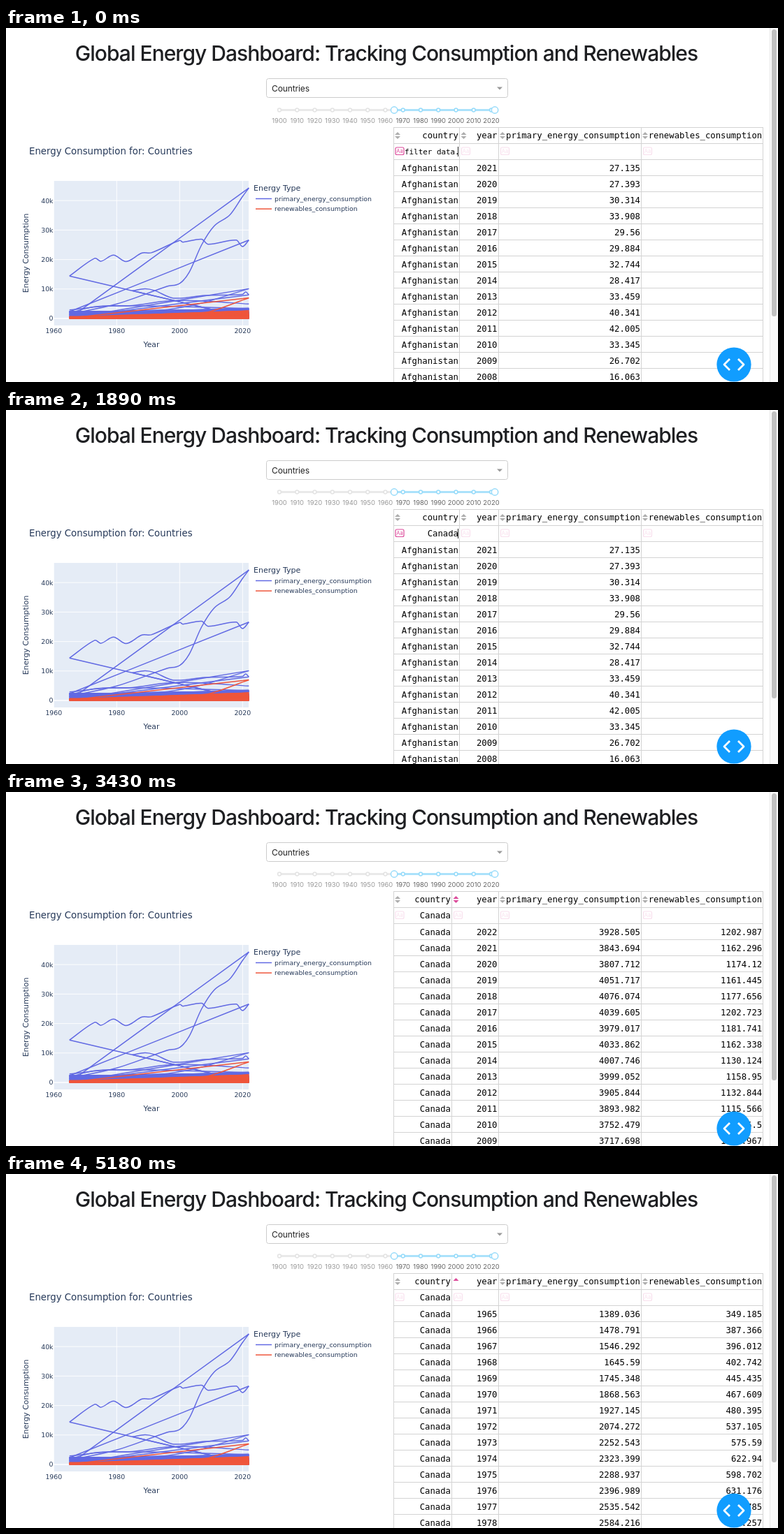
These frames come from a looping animation (1104 px wide and 507 px high, 5.32 s). An HTML page:

```html
<!DOCTYPE html>
<html lang="en">
<head>
<meta charset="utf-8">
<title>Energy dashboard</title>
<style>
  html, body { margin: 0; width: 100%; height: 100%; overflow: hidden; background: #fff; }
  svg { display: block; width: 1104px; height: 507px; }
  text { white-space: pre; }
  .ui { font-family: Inter, sans-serif; font-optical-sizing: none; }
  .plot { font-family: "DejaVu Sans", sans-serif; fill: #263959; }
  .mono { font-family: "DejaVu Sans Mono", monospace; font-size: 12.28px; fill: #000; }
  .end { text-anchor: end; }
  .mid { text-anchor: middle; }
</style>
</head>
<body>
<svg id="stage" viewBox="0 0 1104 507"></svg>
<script>
const LOOP = 5320;
const FILTERED = 2240, HOVER = 3080, YEAR_HOVER = 3290, SORTED = 4130;
const GREY = '#adadad', PINK = '#dc4b9b', BLUE = '#96dbfa', RULE = '#d3d3d3';
const PURPLE = '#6169e3', RED = '#ef553b';
const stage = document.getElementById('stage');
const timed = [];

function add(tag, attrs, parent = stage, text = '') {
  const el = document.createElementNS('http://www.w3.org/2000/svg', tag);
  for (const key in attrs) el.setAttribute(key, attrs[key]);
  el.textContent = text;
  parent.appendChild(el);
  return el;
}
const rect = (x, y, width, height, fill, rx = 0, parent = stage) =>
  add('rect', { x, y, width, height, fill, rx }, parent);
const path = (d, stroke, width = 1, parent = stage) =>
  add('path', { d, stroke, fill: 'none', 'stroke-width': width, 'stroke-linejoin': 'round' }, parent);
const label = (text, x, y, cls, size, parent = stage, more = {}) =>
  add('text', { x, y, class: cls, ...(size && { 'font-size': size }), ...more }, parent, text);

// Shows an element only inside the given [from, to) spans.
const during = (el, ...spans) => timed.push({ el, spans });

function drawControls() {
  label('Global Energy Dashboard: Tracking Consumption and Renewables', 544, 47, 'ui mid', 30, stage,
    { 'font-weight': 500, fill: '#1e1f22', 'letter-spacing': -0.98 });
  add('rect', { x: 372.5, y: 72.5, width: 345, height: 27, rx: 3, fill: '#fff', stroke: '#ccc' });
  label('Countries', 380, 90.6, 'ui', 12, stage, { fill: '#222', 'letter-spacing': -0.12 });
  add('path', { d: 'M702 84.5h8l-4 4z', fill: '#999' });

  const yearX = year => 391 + (year - 1900) * 2.525;
  rect(389, 116, 312, 3, '#e9e9e9', 1.5);
  rect(yearX(1965), 116, yearX(2022) - yearX(1965), 3, '#abe2fb');
  const knob = (year, r, stroke) =>
    add('circle', { cx: yearX(year), cy: 117.5, r, stroke, fill: '#fff', 'stroke-width': 1.5 });
  for (let year = 1900; year <= 2020; year += 10) {
    const active = year >= 1965;
    knob(year, 2.4, active ? BLUE : '#e3e3e3');
    label(year, yearX(year), 136.3, 'ui mid', 9.4, stage, { fill: active ? '#666' : '#999' });
  }
  knob(1965, 4.7, BLUE);
  knob(2022, 4.7, BLUE);
}

const chartX = year => 68.3 + (year - 1960) * 4.5;
const chartY = value => 416 - value * 4.22;

// Smooth curve through [year, value] points.
function spline(points) {
  const p = points.map(([year, value]) => [chartX(year), chartY(value)]);
  let d = 'M' + p[0];
  for (let i = 0; i < p.length - 1; i++) {
    const a = p[i], b = p[i + 1], before = p[i - 1] || a, after = p[i + 2] || b;
    const reach = (b[0] - a[0]) / 3;
    const slope = (q, r) => (r[1] - q[1]) / (r[0] - q[0]);
    d += `C${a[0] + reach} ${a[1] + reach * slope(before, b)} `
      + `${b[0] - reach} ${b[1] - reach * slope(a, after)} ${b}`;
  }
  return d;
}

function drawChart() {
  label('Energy Consumption for: Countries', 33, 180.5, 'plot', 13.3);
  rect(68, 219, 279, 207, '#e5ecf6');
  for (let i = 0; i < 5; i++) {
    const y = chartY(i * 10);
    path(`M68 ${y}H347`, '#fff', i ? 0.9 : 1.6);
    label(i ? i * 10 + 'k' : '0', 67.5, y + 3.3, 'plot end', 9.35);
  }
  for (let year = 1960; year <= 2020; year += 20) {
    path(`M${chartX(year)} 219V426`, '#fff', 0.9);
    label(year, chartX(year), 436.8, 'plot mid', 9.35);
  }
  label('Year', 208, 457, 'plot mid', 10.9);
  label('Energy Consumption', 0, 0, 'plot mid', 10.9, stage, { transform: 'translate(31.7 322.5) rotate(-90)' });

  let seed = 11;
  const random = () => (seed = seed * 16807 % 2147483647) / 2147483647;
  const curve = (points, color = PURPLE) => path(spline(points), color, 1.5);
  // Straight stroke that links one country's first year to another's last.
  const jump = (first, last, color = PURPLE, start = 1965) =>
    curve([[start, first], [2022, last]], color);

  function smallCountries(count, first, last, color) {
    for (let i = 0; i < count; i++) {
      const from = random() * first, to = random() * last, phase = random() * 6;
      const points = [];
      for (let u = 0; u <= 1; u += 0.125) {
        const wave = 0.12 * Math.min(from, 1) * Math.sin(phase + u * 9);
        points.push([1965 + u * 57, from + (to - from) * u + wave]);
      }
      curve(points, color);
      jump(from, to * random(), color);
    }
  }

  smallCountries(34, 2.4, 3.8, PURPLE);
  curve([[1965, 1.8], [1973, 4], [1985, 4.4], [1996, 5.9], [2006, 6], [2022, 4.9]]);
  curve([[1965, 2.9], [1979, 4.3], [2022, 3.4]]);
  curve([[1965, 0.6], [1990, 2.3], [2005, 4.7], [2022, 10.1]]);
  curve([[1985, 9.4], [1989, 10.1], [1992, 9.5], [1998, 6.9], [2008, 7.8], [2020, 8.2], [2021, 9], [2022, 8]]);
  curve([[1965, 14.4], [1973, 20.4], [1975, 19.4], [1979, 21.5], [1983, 19.3], [1988, 22.2], [1991, 22.3],
    [2000, 26.5], [2001, 25.9], [2007, 26.9], [2009, 25.2], [2018, 26.6], [2020, 24.4], [2022, 26.6]]);
  curve([[1965, 1.5], [1980, 4.9], [1996, 10.9], [2000, 11.9], [2003, 15.6], [2007, 25],
    [2011, 31.4], [2016, 35.2], [2020, 41.4], [2022, 44.3]]);
  jump(0.1, 44.3);
  jump(2.3, 26.6);
  jump(0.1, 10.1);
  jump(0.3, 8);
  jump(14.4, 0.1);
  jump(9.4, 0.1, PURPLE, 1985);

  smallCountries(26, 0.5, 2.6, RED);
  rect(91, 412.5, 256, 4.3, RED);
  curve([[1965, 0.1], [1995, 0.6], [2008, 1.9], [2022, 7]], RED);
  jump(0.1, 7, RED);

  label('Energy Type', 354, 233, 'plot', 11);
  [['primary_energy_consumption', PURPLE], ['renewables_consumption', RED]].forEach(([name, color], i) => {
    const y = 244.5 + i * 14.6;
    path(`M357 ${y}h23`, color, 1.5);
    label(name, 384, y + 3.3, 'plot', 9.36);
  });
}

function sortIcon(x, color = GREY, upOnly = false, parent = stage) {
  const d = `M${x - 4} 153l4 -4 4 4z` + (upOnly ? '' : `M${x - 4} 155l4 4 4 -4z`);
  return add('path', { d, fill: color }, parent);
}

function caseIcon(x, opacity = 0.17, parent = stage) {
  const g = add('g', { opacity }, parent);
  add('rect', { x: x + 0.5, y: 171, width: 12, height: 10.5, rx: 2, fill: 'none', stroke: PINK, 'stroke-width': 1.2 }, g);
  label('Aa', x + 6.5, 179, 'ui mid', 7.5, g, { fill: PINK });
  return g;
}

const cell = (text, x, y, parent) => label(text, x, y, 'mono end', 0, parent);

// Edge and header of the country column at a given right side.
function countryColumn(right) {
  const g = add('g', {});
  path(`M${right + 1.5} 142V507`, RULE, 1, g);
  cell('country', right, 158.3, g);
  caseIcon(right + 4, undefined, g);
  return g;
}

function rows(country, right, firstYear, step, energy, renewables = '') {
  const g = add('g', {});
  const green = renewables.split(' ');
  energy.split(' ').forEach((value, i) => {
    const y = 204.6 + i * 23;
    cell(country, right, y, g);
    cell(firstYear + i * step, 702.5, y, g);
    cell(value, 907, y, g);
    cell(green[i] || '', 1081.2, y, g);
  });
  return g;
}

function drawTable() {
  for (let y = 142.5; y < 507; y += 23) path(`M554 ${y}H1083`, RULE);
  for (const x of [554.5, 704.5, 908.5, 1082.5]) path(`M${x} 142V507`, RULE);
  cell('year', 702.5, 158.3);
  cell('primary_energy_consumption', 907, 158.3);
  cell('renewables_consumption', 1081.2, 158.3);
  for (const x of [710, 914]) {
    sortIcon(x);
    caseIcon(x - 3);
  }

  during(countryColumn(647), [0, FILTERED]);
  during(countryColumn(636), [FILTERED, LOOP]);
  during(sortIcon(560), [0, HOVER], [YEAR_HOVER, LOOP]);
  during(sortIcon(560, PINK), [HOVER, YEAR_HOVER]);
  during(sortIcon(654.5), [0, FILTERED]);
  during(sortIcon(643.5), [FILTERED, YEAR_HOVER]);
  during(sortIcon(643.5, PINK), [YEAR_HOVER, SORTED]);
  during(sortIcon(643.5, PINK, true), [SORTED, LOOP]);
  during(caseIcon(556.5, 1), [0, HOVER]);
  during(caseIcon(556.5), [HOVER, LOOP]);

  during(rows('Afghanistan', 647, 2021, -1,
    '27.135 27.393 30.314 33.908 29.56 29.884 32.744 28.417 33.459 40.341 42.005 33.345 26.702 16.063'),
    [0, FILTERED]);
  during(rows('Canada', 636, 2022, -1,
    '3928.505 3843.694 3807.712 4051.717 4076.074 4039.605 3979.017 4033.862 4007.746 3999.052 3905.844 3893.982 3752.479 3717.698',
    '1202.987 1162.296 1174.12 1161.445 1177.656 1202.723 1181.741 1162.338 1130.124 1158.95 1132.844 1115.566 1056.5 1098.967'),
    [FILTERED, SORTED]);
  during(rows('Canada', 636, 1965, 1,
    '1389.036 1478.791 1546.292 1645.59 1745.348 1868.563 1927.145 2074.272 2252.543 2323.399 2288.937 2396.989 2535.542 2584.216',
    '349.185 387.366 396.012 402.742 445.435 467.609 480.395 537.105 575.59 622.94 598.702 631.176 652.785 691.257'),
    [SORTED, LOOP]);
}

function drawFilter() {
  const clip = add('clipPath', { id: 'field' });
  rect(570, 167, 77, 20, '#000', 0, clip);
  during(label('filter data...', 570, 181, 'mono', 0, stage,
    { style: 'font-size:10.9px', 'clip-path': 'url(#field)' }), [0, 630]);

  const keys = [630, 770, 1260, 1540, 1750, 1890, FILTERED];
  for (let n = 1; n <= 6; n++) {
    during(cell('Canada'.slice(0, n), 647, 181.3), [keys[n - 1], keys[n]]);
  }
  during(cell('Canada', 636, 181.3), [FILTERED, LOOP]);
  during(rect(646, 170, 1, 14, '#222'), [0, 210], [630, FILTERED]);
  during(rect(635.5, 170, 1, 14, '#222'), [FILTERED, 2380], [2940, 3430]);
}

function drawChrome() {
  add('circle', { cx: 1041, cy: 482, r: 24.6, fill: '#119dff' });
  path('M1035 474l-8 8 8 8M1047 474l8 8 -8 8', '#fff', 2.8);
  rect(1092, 0, 12, 507, '#fafafa');
  rect(1092, 0, 1, 507, '#e8e8e8');
  rect(1095, 2, 7, 411, '#c1c1c1', 3.5);
}

drawControls();
drawChart();
drawTable();
drawFilter();
drawChrome();

function frame() {
  const t = performance.now() % LOOP;
  for (const { el, spans } of timed) {
    const on = spans.some(([from, to]) => t >= from && t < to);
    el.style.visibility = on ? 'visible' : 'hidden';
  }
  requestAnimationFrame(frame);
}
frame();
</script>
</body>
</html>
```
